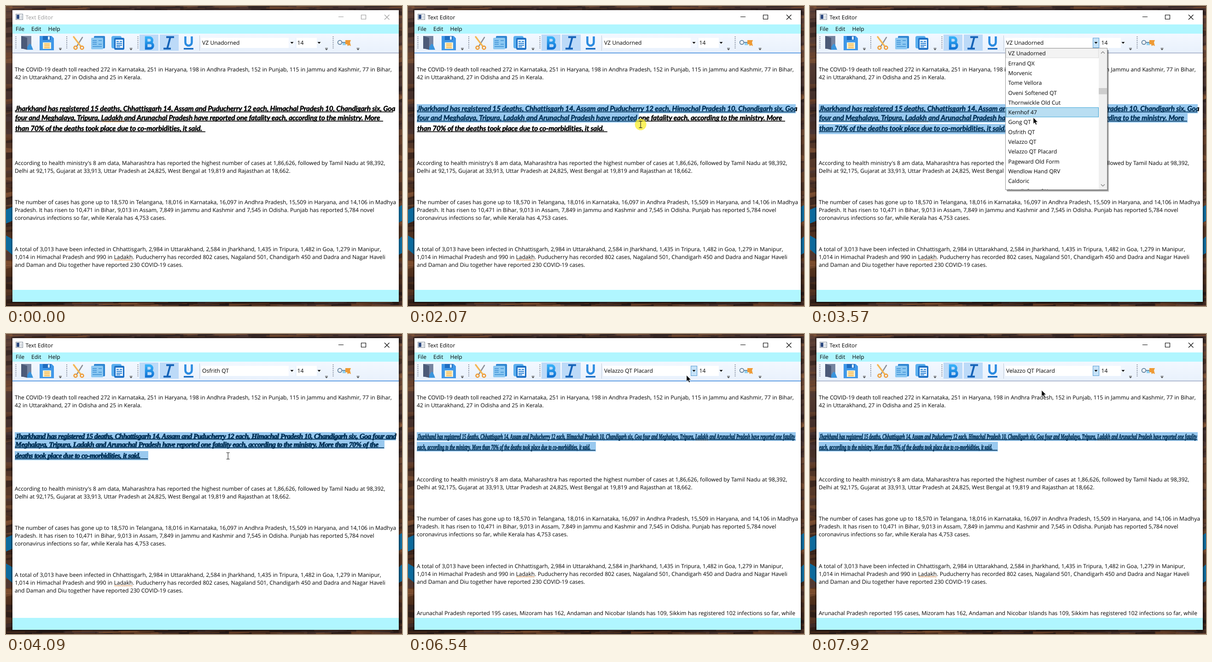
Animation, 860 px wide and 651 px high, one loop 7.99 s. Source, as an HTML page:

```html
<!DOCTYPE html>
<html lang="en">
<head>
<meta charset="utf-8">
<title>Text Editor</title>
<style>
html, body { margin: 0; width: 860px; height: 651px; overflow: hidden; }
svg { display: block; }
text { font: 12.05px "Open Sans", "Noto Sans", sans-serif; word-spacing: .2px; fill: #000; white-space: pre; text-rendering: geometricPrecision; }
.face text { font-weight: 700; font-style: italic; stroke: #000; word-spacing: 0; }
.lean text { font-family: Lato, sans-serif; font-size: 15.4px; letter-spacing: -.1px; stroke-width: .55px; }
.heavy text { font-family: "Liberation Serif", serif; font-size: 15.5px; letter-spacing: -.54px; stroke-width: .85px; }
.poster text { font-family: "Liberation Serif", serif; font-size: 16px; stroke-width: .7px; }
.wave { fill: none; stroke: #e0883c; stroke-width: 1; }
</style>
</head>
<body>
<svg width="860" height="651" viewBox="0 0 860 651">
  <defs>
    <linearGradient id="rock" x2="0" y2="1">
      <stop offset="0" stop-color="#4a3430"/><stop offset=".15" stop-color="#5d4034"/>
      <stop offset=".35" stop-color="#3c2a28"/><stop offset=".5" stop-color="#5a3a28"/>
      <stop offset=".66" stop-color="#3e2a22"/><stop offset=".85" stop-color="#5e3820"/>
      <stop offset="1" stop-color="#2a1a14"/>
    </linearGradient>
    <linearGradient id="bar" x2="0" y2="1">
      <stop offset="0" stop-color="#f3f8ff"/><stop offset="1" stop-color="#e9f1fc"/>
    </linearGradient>
    <linearGradient id="blue" x2="0" y2="1">
      <stop offset="0" stop-color="#35b0f7"/><stop offset="1" stop-color="#1173d4"/>
    </linearGradient>
    <clipPath id="rows"><rect x="425" y="92" width="202" height="306"/></clipPath>
  </defs>

  <rect width="860" height="651" fill="url(#rock)"/>
  <g id="strata"></g>
  <path d="M0 442L14 436V466L0 472ZM0 498L14 506V540L0 528ZM853 436L860 432V466L853 470ZM853 506L860 500V536L853 540Z" fill="#0c6a9c"/>
  <rect id="shade" x="12.5" y="7.5" width="842" height="636" fill="none" stroke="#000" stroke-width="3"/>

  <rect x="14" y="9" width="839" height="633" fill="#fff"/>
  <rect x="14" y="40" width="839" height="20" fill="#b0f6ff"/>
  <rect x="14" y="60" width="839" height="41" fill="url(#bar)"/>
  <rect x="21.5" y="17.5" width="15" height="12" fill="#f4f6f8" stroke="#7d8894"/>
  <rect x="23" y="19" width="6" height="9" fill="#2d4a80"/>
  <path d="M31 21.5h4M31 24h4M31 26.5h4" stroke="#aab4c0"/>
  <g id="chrome">
    <text x="42.5" y="28.5" style="fill:inherit">Text Editor</text>
    <path d="M722 23.5h11M771.5 19.5h10v9h-10zM822 19l10.5 10.5M832.5 19L822 29.5" fill="none" stroke="currentColor" stroke-width="1.1"/>
  </g>
  <text x="21" y="54.3">File</text><text x="55" y="54.3">Edit</text><text x="91.5" y="54.3">Help</text>

  <path d="M21.5 66V94M132 66V94M286.5 66V94M710.5 66V94" stroke="#8790a0" stroke-width="2" stroke-dasharray="2 2"/>
  <g id="overflow" fill="#444"></g>
  <path d="M33 65h22v28H33z" fill="#7684a0"/><path d="M33 65l13 4v26l-13-3z" fill="#4c5a78"/>
  <path d="M46 95V89l5-7 3 1 5 12z" fill="#3a94dc"/>
  <path d="M73 65h26l5 5v26H73z" fill="#3f97e8"/><path d="M80 65h17v9H80z" fill="#1f6cc0"/>
  <path d="M91 66h4v7h-4z" fill="#dcecff"/><path d="M80 79h18v14H80z" fill="#fff3d2"/>
  <path d="M83 82.5h12M83 86.5h12M83 90.5h12" stroke="#f3b13c" stroke-width="2"/>
  <path d="M166 68l-12 19" stroke="#8c8f98" stroke-width="2.5" stroke-linecap="round"/>
  <path d="M147 67l15 20" stroke="#f4b654" stroke-width="3.5" stroke-linecap="round"/>
  <g fill="none" stroke="#ee9a35" stroke-width="2.5"><circle cx="151" cy="90.5" r="3.5"/><circle cx="165" cy="90.5" r="3.5"/></g>
  <rect x="191" y="65" width="24" height="27" rx="2" fill="#2f86d2"/>
  <rect x="185" y="69" width="26" height="25" rx="2" fill="#8cc8f2"/>
  <path d="M188 75h9M188 79h9M201 75h7M188 83h9M201 83h7M188 88h20" stroke="#3d8fd4" stroke-width="1.5"/>
  <rect x="229" y="65" width="22" height="27" rx="4" fill="#5aaeee"/>
  <rect x="235" y="69" width="22" height="26" rx="3" fill="#1d70c6"/>
  <rect x="238" y="73" width="16" height="18" fill="#e6f3ff"/>
  <path d="M240 77h5M247 77h5M240 81h12M240 85h12M240 88.5h8" stroke="#2a80d2" stroke-width="1.8"/>
  <path d="M290 62h41v35h-41zM334 62h41v35h-41z" fill="#bcdaf8"/>
  <path d="M304.5 68.5h7a5.5 5.5 0 0 1 0 11.5h-7zM304.5 80h8.500a6 6 0 0 1 0 12h-8.500z" fill="none" stroke="url(#blue)" stroke-width="5.5"/>
  <path d="M348 67.5h17M342 92.5h16M357 67L350 93" fill="none" stroke="#1463b8" stroke-width="4"/>
  <path d="M389.5 66v13a7 7 0 0 0 14 0V66" fill="none" stroke="#2b8be0" stroke-width="4.5"/>
  <path d="M386 91h21v3.500h-21z" fill="#1c6fc4"/>
  <path d="M420.5 64V97" stroke="#c3ccd8"/>
  <rect x="424" y="69" width="190" height="22" fill="#fff"/><rect x="631" y="69" width="44" height="22" fill="#fff"/>
  <rect id="drop" x="614.5" y="69.5" width="13" height="21" stroke-width="1"/>
  <path d="M617.5 78h7l-3.500 4zM676.5 78h7l-3.500 4z" fill="#111"/>
  <text id="pick" x="426" y="84.3"></text><text x="632.5" y="84.3">14</text>
  <circle cx="725" cy="79" r="4.3" fill="#fff" stroke="#6c8aa6" stroke-width="2"/>
  <path d="M729 79h9" stroke="#6c8aa6" stroke-width="2"/><rect x="731" y="80" width="7" height="5" fill="#8fd0f2"/>
  <path d="M737 74h12l-2 5 2 8-4-2-3 2-1-4h-4z" fill="#ee9a35"/>

  <rect id="edge" x="14" y="101" width="839" height="1.8"/>
  <g id="faces"></g>
  <g id="top"></g>
  <g id="rest"></g>
  <g id="select" fill="#0078d7" fill-opacity=".4"></g>
  <rect x="14" y="616" width="839" height="26" fill="#b0f6ff"/>

  <g id="popup">
    <path d="M428 96H649V403H428z" fill="#000" fill-opacity=".22"/>
    <path d="M427 95H647.5V401H427z" fill="#000" fill-opacity=".35"/>
    <rect x="424.5" y="91.5" width="221" height="307" fill="#fff" stroke="#9a9a9a"/>
    <rect x="627" y="92" width="18" height="306" fill="#f0f0f0"/>
    <rect id="thumb" x="627" width="18" height="13.5" fill="#cdcdcd"/>
    <path d="M632 103l4-4 4 4M632 387l4 4 4-4" fill="none" stroke="#777" stroke-width="1.2"/>
    <rect x="425.5" y="92.5" width="201" height="20" fill="#f3f3f3" stroke="#dcdcdc"/>
    <rect id="hover" x="425.5" width="201" height="20.5" fill="#b9def2" stroke="#3fa6d8"/>
    <g id="list" clip-path="url(#rows)"></g>
  </g>

  <circle id="halo" r="12.5" fill="#f8ee2c" fill-opacity=".75"/>
  <path id="arrow" d="M0 0V13.500L3.100 10.700L5.400 15.600L7.700 14.600L5.500 9.800H9.700Z" fill="#000" stroke="#fff" stroke-width=".7"/>
  <path id="beam" d="M-3.500-7H-1Q0-7 0-6Q0-7 1-7H3.500M0-6V6M-3.500 7H-1Q0 7 0 6Q0 7 1 7H3.500" fill="none" stroke="#222" stroke-width="1.1"/>
</svg>
<script>
const LOOP = 7990, ROW = 21.31;
const $ = id => document.getElementById(id);
const show = (id, on) => $(id).style.display = on ? '' : 'none';
const put = (id, x, y) => $(id).setAttribute('transform', `translate(${x} ${y})`);
const label = (s, x, y) => `<text x="${x}" y="${y}">${s}</text>`;
const block = (lines, y) => lines.map((s, i) => label(s, 19, y + i * 17.2)).join('');
const wave = (x0, x1, y) => {
  let d = `M${x0} ${y}`;
  for (let x = x0, up = 1; x < x1; x += 2, up = -up) d += `l2 ${up * 1.6}`;
  return `<path class="wave" d="${d}"/>`;
};

const names = ['VZ Unadorned', 'Errand QX', 'Morvenic', 'Tome Vellora', 'Oveni Softened QT',
  'Thornwickle Old Cut', 'Kernhof 47', 'Gong QT', 'Osfrith QT', 'Velazzo QT', 'Velazzo QT Placard',
  'Pageward Old Form', 'Wendlow Hand QRV', 'Caldoric', 'Norvik Sans QX', 'Lampwalk', 'Bristle Script QT',
  'Cupboard Symbol 4', 'Tamarindan QX', 'Dorveno QT', 'Fortellio', 'Decade Classroom', 'Hippolar', 'Decade'];

const story = ('Jharkhand has registered 15 deaths, Chhattisgarh 14, Assam and Puducherry 12 each, Himachal Pradesh 10, ' +
  'Chandigarh six, Goa four and Meghalaya, Tripura, Ladakh and Arunachal Pradesh have reported one fatality each, ' +
  'according to the ministry. More than 70% of the deaths took place due to co-morbidities, it said.').split(' ');

// lines: word count, baseline, right end, selection top and bottom
const faces = [
  { cls: 'lean', name: 0, from: 0, shift: 0, squeeze: 1, typo: [209, 257, 250.5],
    lines: [[18, 228, 841, 213, 233], [18, 248, 819, 233, 253], [99, 271, 433, 256, 278]] },
  { cls: 'heavy', name: 8, from: 3960, shift: -5, squeeze: 1, typo: [146, 190, 247.5],
    lines: [[20, 226.5, 846, 213, 231], [20, 245, 821, 231, 249], [99, 269, 308, 254, 274]] },
  { cls: 'poster', name: 10, from: 5900, shift: -24.5, squeeze: .563, typo: [624, 652, 229.5],
    lines: [[30, 227.5, 841, 213, 232], [99, 250.5, 407, 234, 255]] }
];

// dropdown: opened, item clicked, focus back in the text
const drops = [[3140, 3820, 3960], [5030, 5600, 5900], [6700, 7870, LOOP]];
const presses = [[1000, 2440], [3140, 3210], [3760, 3820], [5030, 5100], [5550, 5600], [6700, 6770], [7810, 7870]];
const path = [[60, 560, 548], [500, 160, 300], [810, 53, 220], [860, 47, 220], [1000, 22, 222], [1150, 22, 222],
  [1730, 130, 245], [2070, 505, 257], [2160, 520, 268], [2260, 437, 269.5], [2440, 437, 269.5], [2960, 621, 82],
  [3250, 621, 82], [3450, 500, 205], [3570, 485, 242], [3700, 483, 265], [4090, 482, 265], [4460, 545, 54],
  [4710, 560, 56], [4830, 621, 82], [5130, 621, 82], [5380, 492, 118], [5440, 487.5, 121.5], [5470, 487.5, 121.5],
  [5550, 490, 144], [6120, 490, 144], [6600, 621, 82], [6900, 621, 84], [7230, 491, 120], [7300, 493.5, 136],
  [7480, 500, 240], [7620, 502, 238], [7670, 503, 122], [LOOP, 503, 122]];

const within = (t, [a, b]) => t >= a && t < b;

function pointer(t) {
  const i = path.findIndex(p => p[0] > t);
  if (i < 1) return path[i < 0 ? path.length - 1 : 0].slice(1);
  const [a, x0, y0] = path[i - 1], [b, x1, y1] = path[i], k = (t - a) / (b - a);
  return [x0 + (x1 - x0) * k, y0 + (y1 - y0) * k];
}

// seeded rock layers, visible only around the window
function strata() {
  let seed = 7;
  const rand = () => (seed = seed * 16807 % 2147483647) / 2147483647;
  const tones = ['#1c1414', '#2e2022', '#7a4a2a', '#94603a', '#4c3a3c'];
  const streak = (x, y, w, h) =>
    `<path d="M${x} ${y}l${w} ${rand() * 6 - 3}v${h}l${-w} ${rand() * 4}z" fill="${tones[rand() * 5 | 0]}" opacity=".45"/>`;
  let out = '';
  for (let i = 0; i < 70; i++) {
    const y = rand() * 640, h = 3 + rand() * 9;
    out += streak(0, y, 14, h) + streak(853, 640 - y, 7, h);
    out += streak(rand() * 840, rand() * 8, 30 + rand() * 70, 2) + streak(rand() * 840, 642 + rand() * 8, 30 + rand() * 70, 2);
  }
  return out;
}

function build() {
  $('strata').innerHTML = strata();
  $('overflow').innerHTML = [[118, 93], [271.5, 93], [696, 93], [764.5, 93]]
    .map(([x, y]) => `<path d="M${x - 3} ${y - 2}h6v1h-6zM${x - 3} ${y}h6l-3 3z"/>`).join('');
  $('top').innerHTML = block([
    'The COVID-19 death toll reached 272 in Karnataka, 251 in Haryana, 198 in Andhra Pradesh, 152 in Punjab, 115 in Jammu and Kashmir, 77 in Bihar,',
    '42 in Uttarakhand, 27 in Odisha and 25 in Kerala.'], 141.8);
  $('rest').innerHTML = block([
    "According to health ministry's 8 am data, Maharashtra has reported the highest number of cases at 1,86,626, followed by Tamil Nadu at 98,392,",
    'Delhi at 92,175, Gujarat at 33,913, Uttar Pradesh at 24,825, West Bengal at 19,819 and Rajasthan at 18,662.'], 344.5) +
  block([
    'The number of cases has gone up to 18,570 in Telangana, 18,016 in Karnataka, 16,097 in Andhra Pradesh, 15,509 in Haryana, and 14,106 in Madhya',
    'Pradesh. It has risen to 10,471 in Bihar, 9,013 in Assam, 7,849 in Jammu and Kashmir and 7,545 in Odisha. Punjab has reported 5,784 novel',
    'coronavirus infections so far, while Kerala has 4,753 cases.'], 429.5) +
  block([
    'A total of 3,013 have been infected in Chhattisgarh, 2,984 in Uttarakhand, 2,584 in Jharkhand, 1,435 in Tripura, 1,482 in Goa, 1,279 in Manipur,',
    '1,014 in Himachal Pradesh and 990 in Ladakh. Puducherry has recorded 802 cases, Nagaland 501, Chandigarh 450 and Dadra and Nagar Haveli',
    'and Daman and Diu together have reported 230 COVID-19 cases.'], 532) +
  block(['Arunachal Pradesh reported 195 cases, Mizoram has 162, Andaman and Nicobar Islands has 109, Sikkim has registered 102 infections so far, while'], 634.2) +
  wave(235, 275, 550.5);

  $('faces').innerHTML = faces.map((f, n) => {
    let at = 0;
    const rows = f.lines.map(([count, y, end]) => {
      const s = story.slice(at, at += count).join(' ');
      return `<text transform="translate(20 ${y}) scale(${f.squeeze} 1)">${s}</text>` +
        `<rect x="19.5" y="${y + 1}" width="${end - 19.5}" height="1.6"/>`;
    });
    return `<g id="face${n}" class="face ${f.cls}">${rows.join('')}${wave(...f.typo)}</g>`;
  }).join('');
}

function selection(t, lines, x, y) {
  if (t < 1000) return '';
  const dragging = t < 2440, last = dragging ? (y < 233 ? 0 : y < 259 ? 1 : 2) : lines.length - 1;
  return lines.slice(0, last + 1).map(([, , end, a, b], i) => {
    const right = dragging && i === last ? Math.min(end + 1, x - 4) : end + 1;
    return `<rect x="19" y="${a}" width="${Math.max(0, right - 19)}" height="${b - a}"/>`;
  }).join('');
}

let listed = -1, marked = null;

function render(t) {
  const now = faces.filter(f => t >= f.from).length - 1, face = faces[now];
  const [x, y] = pointer(t);
  const drop = drops.find(d => t >= d[0] && t < d[2]);
  const open = !!drop && t < drop[1];
  const active = t >= 1000;

  faces.forEach((f, i) => show('face' + i, i === now));
  put('rest', 0, face.shift);
  $('pick').textContent = names[face.name];
  $('chrome').style.color = $('chrome').style.fill = active ? '#000' : '#999';
  $('shade').style.strokeOpacity = active ? .3 : .18;
  $('edge').style.fill = drop || t < 60 ? '#a9b3cc' : active ? '#5698e2' : '#7eb4ea';

  const lit = drop || (x > 424 && x < 628 && y > 69 && y < 91);
  $('drop').style.fill = lit ? '#c5e2f8' : '#f3f8ff';
  $('drop').style.stroke = lit ? '#5a9fd4' : 'none';

  const marks = selection(t, face.lines, x, y);
  if (marks !== marked) $('select').innerHTML = marked = marks;

  show('popup', open);
  if (open) {
    if (listed !== face.name) {
      listed = face.name;
      $('list').innerHTML = names.slice(listed, listed + 15)
        .map((s, i) => label(s, 430.5, 107.3 + i * ROW)).join('');
      $('thumb').setAttribute('y', 178 + listed);
    }
    // the highlight trails the pointer slightly
    const [hx, hy] = pointer(t - 60), row = Math.floor((hy - 92.5) / ROW);
    show('hover', row >= 0 && hx < 627);
    $('hover').setAttribute('y', 92.5 + Math.max(0, row) * ROW);
  }

  const beam = y > 102 && !drop;
  show('beam', t >= 60 && beam);
  show('arrow', t >= 60 && !beam);
  show('halo', presses.some(p => within(t, p)));
  ['beam', 'arrow', 'halo'].forEach(id => put(id, x, y));
}

build();
const start = performance.now();
(function frame() {
  render((performance.now() - start) % LOOP);
  requestAnimationFrame(frame);
})();
</script>
</body>
</html>
```
